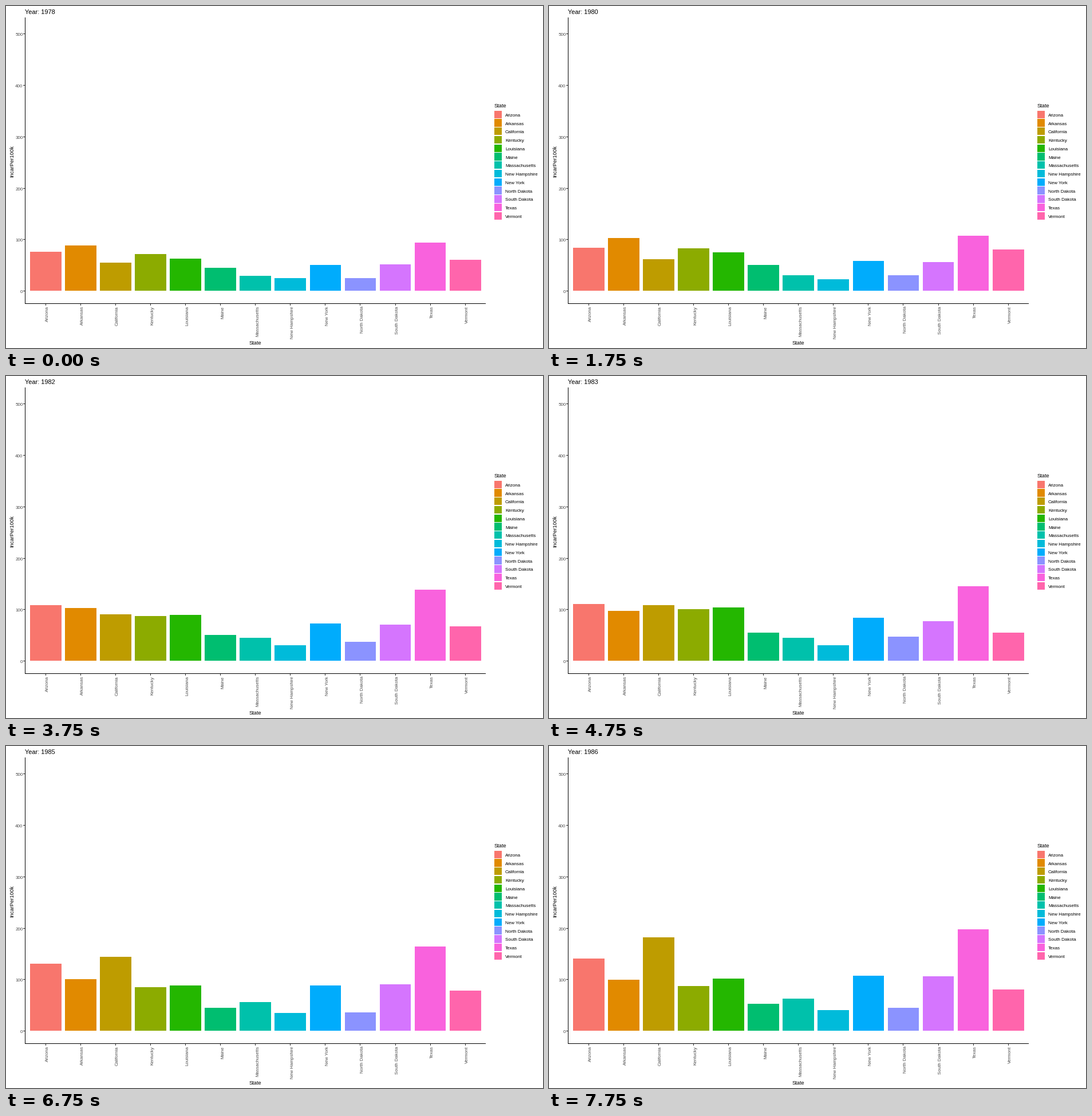
A matplotlib script for the animation above (8000 ms loop, 938 by 597 pixels).

```python
import matplotlib.pyplot as plt
from matplotlib.animation import FuncAnimation
from matplotlib.patches import Rectangle

W, H, DPI = 938, 597, 64
BASE, SCALE = 497.2, 0.898           # y of zero, pixels per unit
LEFT, STEP = 33.2, 61.02             # panel edge, distance between bars
START_YEAR = 1978
GREY = "#4d4d4d"

# state: (colour, rate for each year from 1978 to 1986)
STATES = {
    "Arizona": ("#F8766D", [76, 77, 84, 104.5, 108.5, 111, 111, 130.5, 140.5]),
    "Arkansas": ("#E18A00", [88.5, 96, 103, 107.5, 103, 97, 100, 100.5, 99]),
    "California": ("#BE9C00", [54.5, 57.5, 61, 74, 90.5, 108.5, 125, 143.5, 181.5]),
    "Kentucky": ("#8CAB00", [71.5, 77, 83, 92, 87.5, 100.5, 92, 84.5, 87.5]),
    "Louisiana": ("#24B700", [63, 69, 75, 69.5, 89.5, 104, 96, 88.5, 102]),
    "Maine": ("#00BE70", [45, 47.5, 50.5, 46.5, 50.5, 54.5, 50, 45, 52.5]),
    "Massachusetts": ("#00C1AB", [29.5, 30, 30.5, 38, 45, 45, 50, 56, 63]),
    "New Hampshire": ("#00BBDA", [25, 23, 22.5, 31.5, 30.5, 30.5, 31, 34.5, 40.5]),
    "New York": ("#00ACFC", [50.5, 54, 58, 71.5, 72.5, 83.5, 86, 88.5, 107.5]),
    "North Dakota": ("#8B93FF", [25, 27.5, 30.5, 32.5, 37, 46.5, 31, 36, 45]),
    "South Dakota": ("#D575FE", [51.5, 54, 56, 59.5, 70.5, 77, 83.5, 90.5, 106.5]),
    "Texas": ("#F962DD", [94, 96, 107.5, 114, 138.5, 145.5, 147, 164, 197.5]),
    "Vermont": ("#FF65AC", [60, 70, 80, 83.5, 66.5, 55, 66, 78, 80]),
}

plt.rcParams["font.family"] = "Liberation Sans"
fig = plt.figure(figsize=(W / DPI, H / DPI), dpi=DPI, facecolor="white")
ax = fig.add_axes([0, 0, 1, 1])
ax.set_xlim(0, W)
ax.set_ylim(H, 0)
ax.axis("off")


def box(x0, y0, x1, y1, color):
    """Filled rectangle on whole pixels."""
    x0, y0, x1, y1 = (round(v) for v in (x0, y0, x1, y1))
    return ax.add_patch(Rectangle((x0, y0), x1 - x0, y1 - y0, facecolor=color,
                                  linewidth=0, antialiased=False))


def label(x, y, text, size, color="black", **kw):
    """Text placed by its baseline, with its size in pixels."""
    return ax.text(x, y, text, fontsize=size * 72 / DPI, color=color,
                   va="baseline", rotation_mode="anchor", **kw)


def bar_top(value):
    return round(BASE - SCALE * value)


bars = []
for i, (name, (color, rates)) in enumerate(STATES.items()):
    x = LEFT + (i + 0.6) * STEP
    bars.append(box(x - 0.45 * STEP, bar_top(rates[0]), x + 0.45 * STEP, BASE, color))
    box(int(x), 520, int(x) + 1, 523, "#333333")
    label(round(x + 4.6), 524, name, 8.05, GREY, rotation=90, ha="right")

    key = 182.6 + 14.76 * i
    box(853, key, 866.4, key + 13.3, color)
    label(872, round(key + 10.3), name, 8.05)

for value in range(0, 600, 100):
    y = bar_top(value)
    box(30, y, 33, y + 1, "#333333")
    label(29.5, y + 4, str(value), 8.05, GREY, ha="right")

box(33, 20, 34, 520, "black")
box(33, 519, 838, 520, "black")
label(435.5, 591, "State", 9.2, ha="center")
label(13, 271, "IncarPer100k", 9.4, rotation=90, ha="center")
label(853, 177, "State", 9.2)
title = label(33, 14, "", 11.05)


def draw(frame):
    # Each year holds for three steps; the fourth is halfway to the next.
    year, phase = divmod(frame + 1, 4)
    mix = 0.5 if phase == 3 else 0
    title.set_text(f"Year: {START_YEAR + year}")
    for bar, (_, rates) in zip(bars, STATES.values()):
        value = rates[year]
        if mix:
            value += mix * (rates[year + 1] - value)
        top = bar_top(value)
        bar.set_y(top)
        bar.set_height(round(BASE) - top)
    return [title, *bars]


anim = FuncAnimation(fig, draw, frames=32, interval=250, repeat=True, repeat_delay=0)
plt.show()
```
